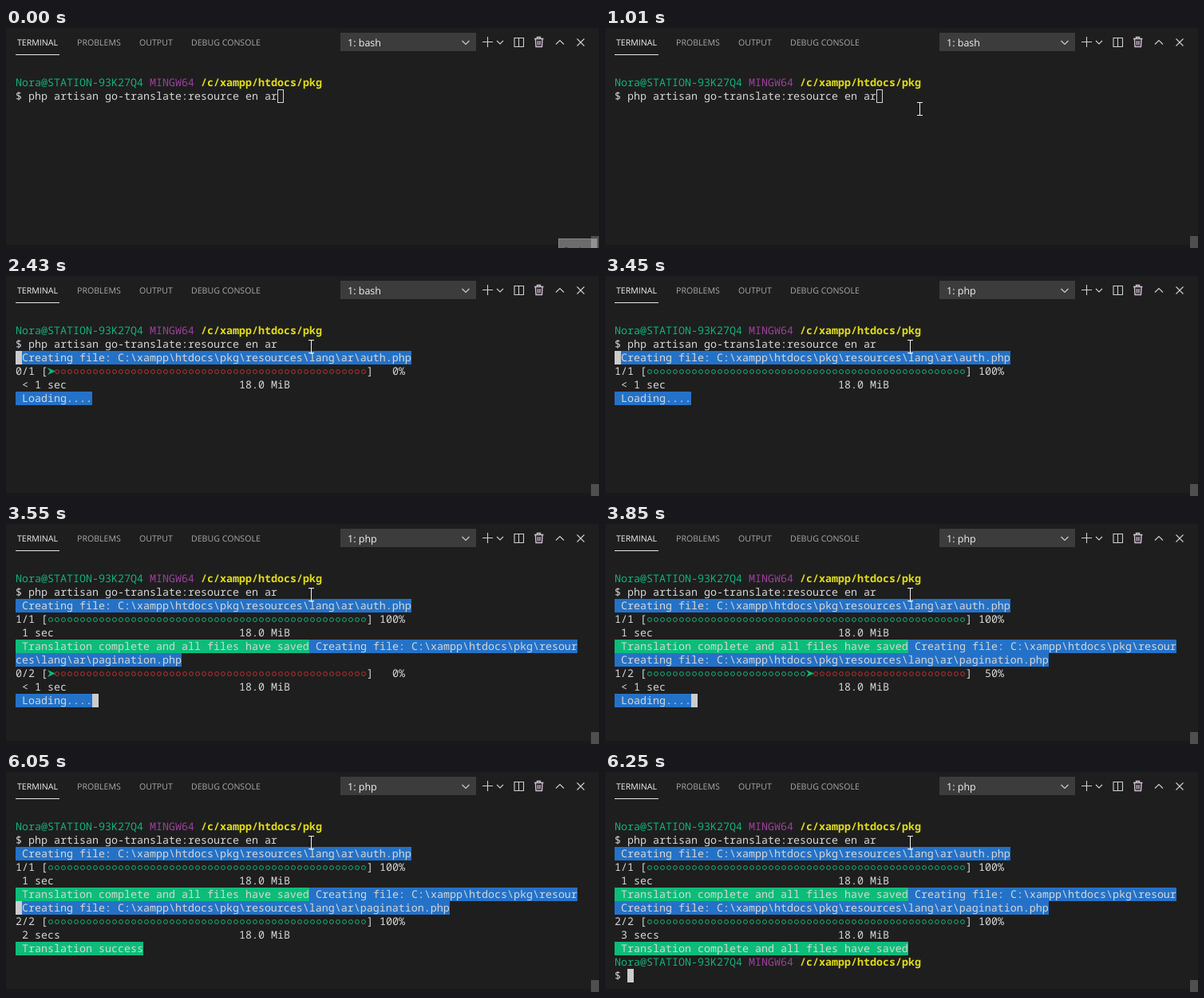
Write an HTML page that moves like this. It is 743 px wide and 276 px high and loops after 7.48 s.

```html
<!DOCTYPE html>
<html lang="en">
<head>
<meta charset="utf-8">
<title>Terminal</title>
<style>
  html, body { margin: 0; width: 100%; height: 100%; overflow: hidden; background: #1e1e1e; }
  svg { display: block; }
  text { white-space: pre; text-rendering: geometricPrecision; }
  .ui { font-family: "Open Sans", "Noto Sans", sans-serif; font-size: 10.6px; font-weight: 500; fill: #a8a8a8; }
  .mono { font-family: "Noto Sans Mono", "DejaVu Sans Mono", monospace; font-size: 13.3333px; }
  .line { fill: none; stroke: #cfcfcf; stroke-width: 1.1; }
</style>
</head>
<body>
<svg width="743" height="276" viewBox="0 0 743 276">
  <defs>
    <pattern id="done" x="12" y="0" width="8" height="17" patternUnits="userSpaceOnUse">
      <circle cx="4" cy="9" r="2.5" fill="none" stroke="#0fae72"/>
    </pattern>
    <pattern id="todo" x="12" y="0" width="8" height="17" patternUnits="userSpaceOnUse">
      <circle cx="4" cy="9" r="2.5" fill="none" stroke="#b52d2d"/>
    </pattern>
  </defs>
  <rect width="743" height="276" fill="#1e1e1e"/>
  <rect y="272" width="743" height="4" fill="#191919"/>

  <g class="ui">
    <text x="14" y="22" fill="#f4f4f4">TERMINAL</text>
    <text x="89" y="22">PROBLEMS</text>
    <text x="167" y="22">OUTPUT</text>
    <text x="232" y="22">DEBUG CONSOLE</text>
  </g>
  <rect x="12" y="33" width="55" height="1" fill="#e7e7e7"/>

  <rect x="419" y="6" width="170" height="23" fill="#3c3c3c"/>
  <text id="shell" class="ui" x="428" y="22.5" style="font-size:12.5px;fill:#f4f4f4"></text>
  <g class="line">
    <path d="M571.5 16l4.5 4.5 4.5-4.5"/>
    <path d="M597 17.5h13M603.5 11v13"/>
    <path d="M615 16l4 4 4-4"/>
    <path d="M637 12.5h11.5v11H637zM642.5 12.5v11"/>
    <path d="M662 13.5h11.5M665.5 13v-1.5h4V13M663.5 14l.5 9.5h7.5l.5-9.5M666.5 16v5.5M669 16v5.5" stroke="#d3bfd3" stroke-width="1.4"/>
    <path d="M689 20.5l5-5 5 5M715.5 13.5l9 9m0-9l-9 9"/>
  </g>

  <rect x="733" y="261" width="10" height="15" fill="#4f4f4f"/>
  <g id="tip">
    <rect x="692.5" y="264.5" width="48" height="14" fill="#6c6c6c" stroke="#858585"/>
    <rect x="733" y="265" width="7" height="11" fill="#929292"/>
    <text x="699" y="283" class="ui" style="fill:#222">Desktop</text>
  </g>
  <g id="screen" class="mono"></g>
  <path id="pointer" fill="none" stroke="#f2f2f2" d="M-3.5-8H3.5M0-8V8M-3.5 8H3.5"/>
</svg>
<script>
const LOOP = 7480, CELL = 8, ROW = 17, LEFT = 12, TOP = 60;
const C = { fg: '#d6d6d6', green: '#0dbc79', blue: '#2472c8', user: '#13b277', host: '#9c409c', path: '#e0dc18' };
const ROOT = 'C:\\xampp\\htdocs\\pkg\\resources\\lang\\ar\\';
const DONE = ' Translation complete and all files have saved';

// Pointer stops: time, x, y
const STOPS = [
  [510, 735.5, 267.5], [610, 694.5, 246.5], [710, 616.5, 210.5], [810, 522.5, 165.5],
  [910, 444.5, 126.5], [1010, 394.5, 101.5], [1110, 373.5, 88.5], [1210, 387.5, 83.5], [1310, 382.5, 88.5]
];

const $ = id => document.getElementById(id);
const X = col => LEFT + col * CELL;
const Y = row => TOP + row * ROW;

const rect = (row, col, cols, fill) =>
  `<rect x="${X(col)}" y="${Y(row)}" width="${cols * CELL}" height="${ROW}" fill="${fill}"/>`;

const words = (row, col, str, fill = C.fg, weight = 500) =>
  `<text x="${X(col)}" y="${Y(row) + 13}" fill="${fill}" font-weight="${weight}">${str.replace(/</g, '&lt;')}</text>`;

const label = (row, col, str, bg) => rect(row, col, str.length, bg) + words(row, col, str);

const prompt = row =>
  words(row, 0, 'Nora@STATION-93K27Q4', C.user) + words(row, 21, 'MINGW64', C.host) +
  words(row, 29, '/c/xampp/htdocs/pkg', C.path, 600);

const dots = (row, col, n, kind) =>
  `<g transform="translate(0 ${Y(row)})"><rect x="${X(col)}" width="${n * CELL}" height="${ROW}" fill="url(#${kind})"/></g>`;

function progress(row, step, max, time) {
  const full = 50 * step / max;
  let s = words(row, 0, `${step}/${max} [`) + words(row, 55, ']') +
    words(row, 57, `${100 * step / max}%`.padStart(4));
  if (full) s += dots(row, 5, full, 'done');
  if (full < 50) {
    s += `<path transform="translate(${X(5 + full)} ${Y(row) + 8.5})" d="M0-4.5L10 0 0 4.5 3 0Z" fill="${C.user}"/>`;
    s += dots(row, 6 + full, 49 - full, 'todo');
  }
  return s + words(row + 1, 1, time) + words(row + 1, 35, '18.0 MiB');
}

// Column and row of the block caret
function caretAt(t) {
  if (t < 1810) return [41, 1];
  if (t < 2030) return [0, 2];
  if (t < 2430) return [12, 5];
  if (t < 2530) return [0, 2];
  if (t < 3450) return [12, 5];
  if (t < 3550) return [0, 2];
  if (t < 3750) return [12, 9];
  if (t < 3850) return [0, 6];
  if (t < 5060) return [12, 9];
  if (t < 6050) return [20, 9];
  if (t < 6150) return [0, 6];
  return t < 6250 ? [46, 9] : [2, 11];
}

function caret(t) {
  const [col, row] = caretAt(t);
  return t < 1310
    ? `<rect x="${X(col) + .5}" y="${Y(row) + .5}" width="7" height="16" fill="none" stroke="${C.fg}"/>`
    : rect(row, col, 1, '#cccccc');
}

function screen(t) {
  let s = prompt(0) + words(1, 0, '$ php artisan go-translate:resource en ar');
  if (t >= 2030) {
    s += label(2, 0, ` Creating file: ${ROOT}auth.php`, C.blue);
    s += progress(3, t < 2530 ? 0 : 1, 1, t < 3550 ? '< 1 sec' : '1 sec');
    if (t < 3550) s += label(5, 0, ' Loading....', C.blue);
  }
  if (t >= 3550) {
    const file = ` Creating file: ${ROOT}pagination.php`;
    s += label(5, 0, DONE, C.green) + label(5, 46, file.slice(0, 42), C.blue);
    s += label(6, 0, t < 3850 ? file.slice(42) : file, C.blue);
    s += progress(7, t < 3850 ? 0 : t < 5060 ? 1 : 2, 2,
      t < 5060 ? '< 1 sec' : t < 6150 ? '2 secs' : '3 secs');
    s += t < 5060 ? label(9, 0, ' Loading....', C.blue)
      : label(9, 0, t < 6150 ? ' Translation success' : DONE, C.green);
  }
  if (t >= 6250) s += prompt(10) + words(11, 0, '$');
  return s + caret(t);
}

let shown = '';
function draw(t) {
  const next = screen(t);
  if (next !== shown) $('screen').innerHTML = shown = next;
  $('shell').textContent = t < 3330 ? '1: bash' : '1: php';
  $('tip').style.display = t < 100 ? '' : 'none';
  const stop = STOPS.filter(p => p[0] <= t).pop();
  $('pointer').style.display = stop ? '' : 'none';
  if (stop) $('pointer').setAttribute('transform', `translate(${stop[1]} ${stop[2]})`);
}

const start = performance.now();
function tick() {
  draw((performance.now() - start) % LOOP);
  requestAnimationFrame(tick);
}
tick();
</script>
</body>
</html>
```
